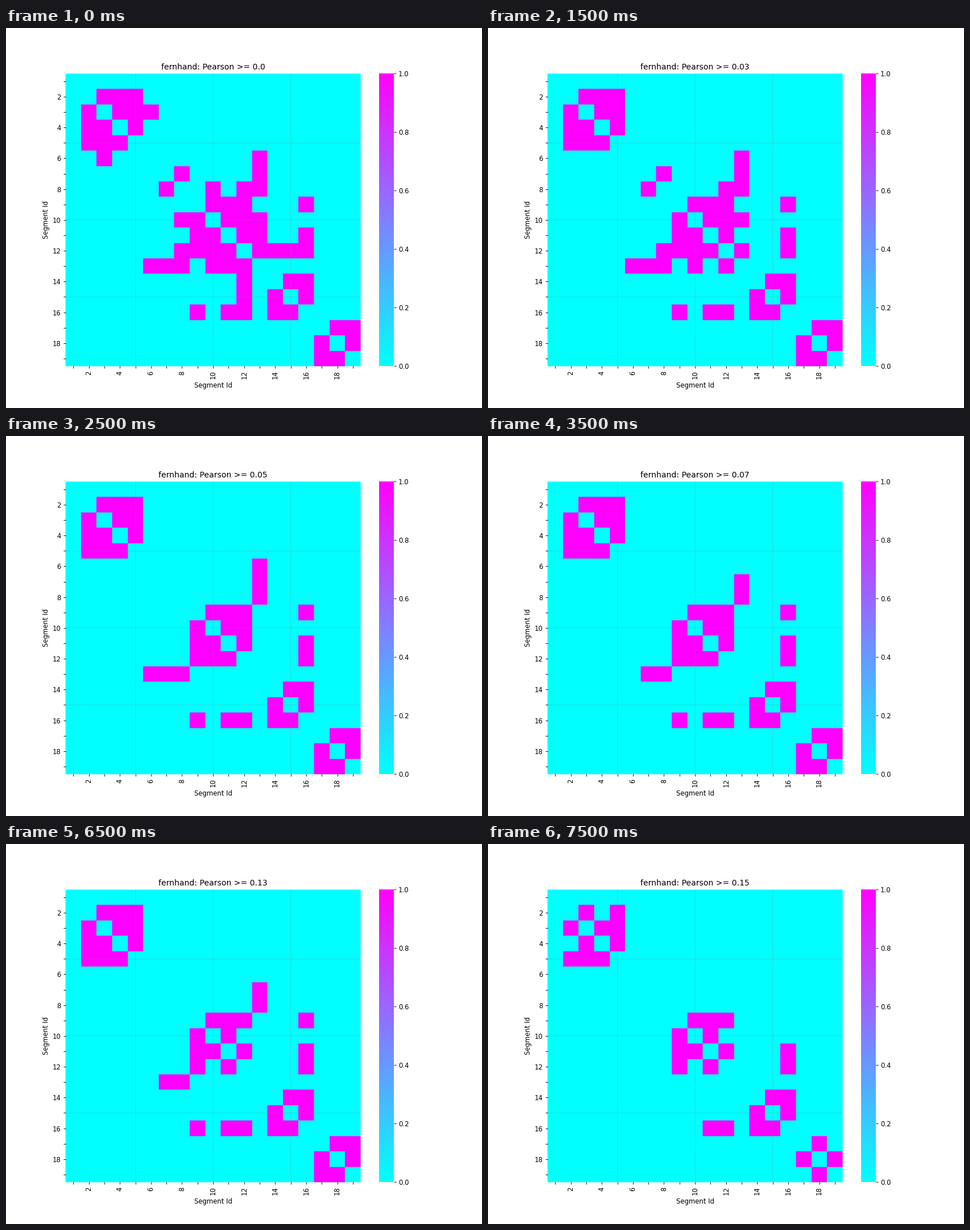
Recreate the animation shown at these times as a matplotlib script. Size 837x669 px, loop 8000 ms.

```python
import numpy as np
import matplotlib.pyplot as plt
from matplotlib.animation import FuncAnimation
from matplotlib.cm import ScalarMappable
from matplotlib.patches import PathPatch
from matplotlib.path import Path

SIZE = 19
STEPS = 16
DPI = 83.7
WIDTH, HEIGHT = 620, 616  # data units of the heatmap

# Groups of fully linked neighbours
BLOCKS = [(2, 5), (9, 12), (14, 16), (17, 19)]

# Fading links: hub, partners, strength of the first partner,
# gain per segment of distance from that partner
FADES = [
    (6, (3, 13), 3, 0.3),
    (8, (10, 12, 7), 1, 1.3),
    (12, (14, 15), 1, 1),
    (13, (11, 10, 12), 1, 3),
    (13, (7, 8), 15, 0),
    (16, (9, 11, 12), 15, 1),
    (4, (2,), 14, 0),
    (12, (10,), 10, 0),
    (19, (17,), 15, 0),
]

# Cell borders fall on whole units
x_edge = np.round(np.linspace(0, WIDTH, SIZE + 1))
y_edge = np.round(np.linspace(0, HEIGHT, SIZE + 1))


def link_strength():
    """Threshold, in hundredths, at which each link disappears."""
    grid = np.zeros((SIZE, SIZE))
    for lo, hi in BLOCKS:
        grid[lo - 1:hi, lo - 1:hi] = STEPS
    for hub, partners, low, gain in FADES:
        for p in partners:
            value = low + gain * abs(p - partners[0])
            grid[hub - 1, p - 1] = grid[p - 1, hub - 1] = value
    np.fill_diagonal(grid, 0)
    return grid


def cell(row, col):
    x0, x1 = x_edge[col:col + 2]
    y0, y1 = y_edge[row:row + 2]
    return Path([(x0, y0), (x1, y0), (x1, y1), (x0, y1), (x0, y0)], closed=True)


def linked_cells(step):
    return Path.make_compound_path(
        *(cell(r, c) for r, c in np.argwhere(strength > step)))


def centre(i, length):
    return (i - 0.5) * length / SIZE


strength = link_strength()

# The small surplus keeps the pixel size from rounding down
fig, ax = plt.subplots(figsize=(837.01 / DPI, 669.01 / DPI), dpi=DPI)
ax.set(xlim=(0, WIDTH), ylim=(HEIGHT, 0), facecolor="cyan",
       xlabel="Segment Id", ylabel="Segment Id")
ax.patch.set_snap(False)
ax.spines[:].set_visible(False)

# One path for all cells leaves no seams between neighbours
cells = PathPatch(linked_cells(0), fc="magenta", lw=0, snap=False)
ax.add_patch(cells)
cells.set_clip_on(False)

ids = np.arange(1, SIZE + 1)
labels = ["" if i % 2 else str(i) for i in ids]
ax.set_xticks(centre(ids, WIDTH), labels, rotation=90)
ax.set_yticks(centre(ids, HEIGHT), labels)

for i in range(5, SIZE, 5):
    ax.axvline(centre(i, WIDTH), color="gray", lw=0.25, snap=False)
    ax.axhline(centre(i, HEIGHT), color="gray", lw=0.25, snap=False)

bar = fig.colorbar(ScalarMappable(cmap="cool"), ax=ax)
bar.outline.set_linewidth(0)
title = ax.set_title("")


def update(step):
    cells.set_path(linked_cells(step))
    title.set_text(f"fernhand: Pearson >= {step / 100}")
    return cells, title


anim = FuncAnimation(fig, update, frames=STEPS, interval=500,
                     repeat=True, repeat_delay=0)
plt.show()
```
